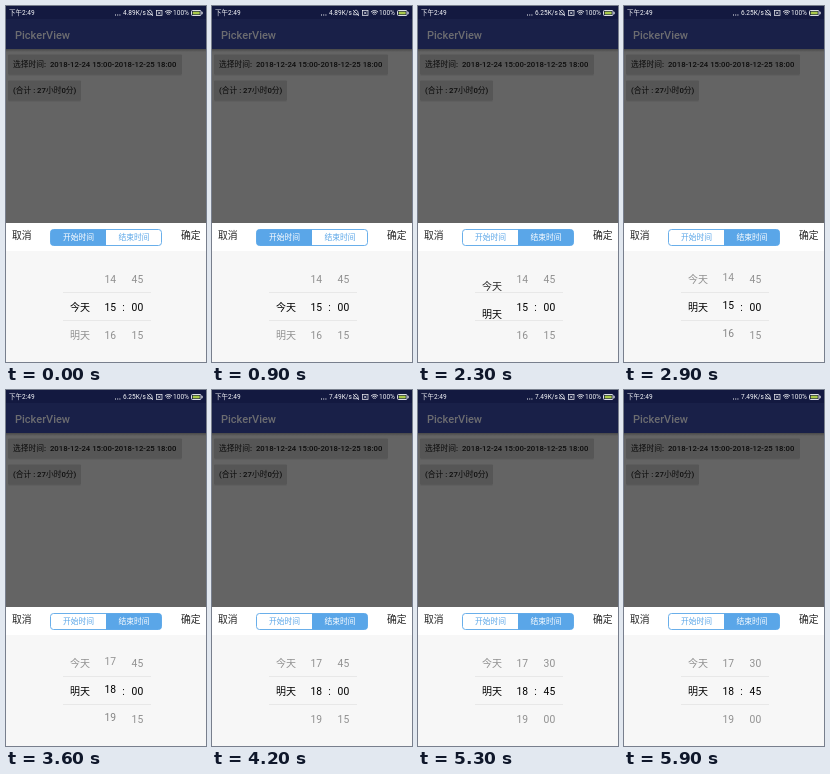
These frames come from a looping animation (200 by 356 pixels, 6000 ms). An HTML page with a canvas:

```html
<!DOCTYPE html>
<html lang="zh">
<head>
<meta charset="utf-8">
<title>PickerView</title>
<style>
html, body { margin: 0; width: 100%; height: 100%; overflow: hidden; background: #646464; }
canvas { display: block; width: 200px; height: 356px; }
</style>
</head>
<body>
<canvas id="stage"></canvas>
<script>
const W = 200, H = 356, LOOP = 6000, STEP = 100;
const ROW = 28, MID = 301.2;
const BLUE = '#5aa6e8';
const FONT = 'Roboto, "Noto Sans CJK SC", "Noto Sans CJK", sans-serif';

const canvas = document.getElementById('stage');
const ctx = canvas.getContext('2d');
const ratio = window.devicePixelRatio || 1;
canvas.width = W * ratio;
canvas.height = H * ratio;
ctx.scale(ratio, ratio);

function rect(x, y, w, h, color) {
  ctx.fillStyle = color;
  ctx.fillRect(x, y, w, h);
}

function roundRect(x, y, w, h, radii) {
  ctx.beginPath();
  ctx.roundRect(x, y, w, h, radii);
}

function text(str, x, y, size, color, align = 'left', weight = 400) {
  ctx.font = `${weight} ${size}px ${FONT}`;
  ctx.fillStyle = color;
  ctx.textAlign = align;
  ctx.textBaseline = 'alphabetic';
  ctx.fillText(str, x, y + size * 0.36);
}

function line(points, color, width = 0.8) {
  ctx.strokeStyle = color;
  ctx.lineWidth = width;
  ctx.beginPath();
  points.forEach(([x, y]) => ctx.lineTo(x, y));
  ctx.stroke();
}

// Interpolates between [time, value] keys with a smooth ease on each span.
function track(t, keys) {
  if (t <= keys[0][0]) return keys[0][1];
  for (let i = 1; i < keys.length; i++) {
    const [t0, v0] = keys[i - 1], [t1, v1] = keys[i];
    if (t < t1) {
      const p = (t - t0) / (t1 - t0);
      return v0 + (v1 - v0) * p * p * (3 - 2 * p);
    }
  }
  return keys[keys.length - 1][1];
}

const pad = n => String(n).padStart(2, '0');
const dayLabel = i => ['今天', '明天'][i] || '';
const hourLabel = i => pad((i + 24) % 24);
const minuteLabel = i => pad(((i % 4 + 4) % 4) * 15);

function drawStatus(t) {
  const ink = '#f4f5f8';
  const speed = t < 1000 ? '4.89' : t < 4000 ? '6.25' : '7.49';
  rect(0, 0, W, 13, '#131940');
  text('下午2:49', 3, 7, 6.5, ink);
  for (let i = 0; i < 3; i++) rect(109 + i * 2.2, 8.5, 1, 1, ink);
  text(speed + 'K/s', 117, 7, 6.5, ink);

  // muted bell
  ctx.strokeStyle = ink;
  ctx.lineWidth = 0.7;
  ctx.beginPath();
  ctx.moveTo(141.5, 8.7);
  ctx.quadraticCurveTo(142, 4, 144, 4);
  ctx.quadraticCurveTo(146, 4, 146.5, 8.7);
  ctx.closePath();
  ctx.stroke();
  line([[141, 4], [147, 10]], ink, 0.7);

  // missing SIM
  ctx.strokeRect(150.5, 4.5, 5.5, 5);
  line([[152, 5.7], [154.5, 8.3]], ink, 0.7);
  line([[154.5, 5.7], [152, 8.3]], ink, 0.7);

  // wifi
  ctx.lineWidth = 0.9;
  for (const r of [1.5, 3.3, 5]) {
    ctx.beginPath();
    ctx.arc(162.5, 9.6, r, -Math.PI * 0.75, -Math.PI * 0.25);
    ctx.stroke();
  }
  text('100%', 167, 7, 6.6, ink);

  // charging battery
  roundRect(185.5, 4.5, 9.5, 5, 1);
  ctx.stroke();
  rect(186.7, 5.6, 7, 2.8, '#a9c94a');
  rect(195.6, 5.8, 1, 2.4, ink);
}

function drawButton(label, y, w) {
  roundRect(2, y, w, 20, 1);
  ctx.fillStyle = '#565656';
  ctx.fill();
  rect(2.5, y + 20, w - 1, 0.8, '#545454');
  text(label, 7, y + 9.5, 7.75, '#0c0c0c', 'left', 500);
}

function drawPage() {
  rect(0, 0, W, H, '#646464');
  rect(0, 13, W, 30, '#192048');
  const shadow = ctx.createLinearGradient(0, 43, 0, 46);
  shadow.addColorStop(0, 'rgba(0,0,0,.28)');
  shadow.addColorStop(1, 'rgba(0,0,0,0)');
  rect(0, 43, W, 3, shadow);
  text('PickerView', 9, 29.3, 11, '#6c6c70', 'left', 500);
  drawButton('选择时间:  2018-12-24 15:00-2018-12-25 18:00', 48.5, 174);
  drawButton('(合计 : 27小时0分)', 74.5, 73);
}

function drawTabs(endActive) {
  const x = 44.5, y = 223.5, w = 111, h = 16, half = w / 2;
  roundRect(x, y, w, h, 3);
  ctx.fillStyle = '#fff';
  ctx.fill();
  roundRect(x + (endActive ? half : 0), y, half, h, endActive ? [0, 3, 3, 0] : [3, 0, 0, 3]);
  ctx.fillStyle = BLUE;
  ctx.fill();
  roundRect(x, y, w, h, 3);
  ctx.strokeStyle = BLUE;
  ctx.lineWidth = 0.9;
  ctx.stroke();
  text('开始时间', 72.5, 231.5, 7.8, endActive ? BLUE : '#fff', 'center');
  text('结束时间', 128, 231.5, 7.8, endActive ? '#fff' : BLUE, 'center');
}

function drawWheel(x, pos, label, size) {
  const base = Math.round(pos);
  for (let i = base - 2; i <= base + 2; i++) {
    const offset = i - pos, d = Math.abs(offset);
    const alpha = track(d, [[0.6, 1], [1, 0.42], [1.4, 0.22], [1.7, 0]]);
    if (alpha <= 0) continue;
    text(label(i), x, MID + offset * ROW, size, `rgba(0,0,0,${alpha})`, 'center');
  }
}

function drawPicker(t) {
  rect(0, 217, W, 28, '#fff');
  rect(0, 245, W, H - 245, '#f7f7f7');
  text('取消', 6, 229.5, 9.8, '#222');
  text('确定', 194.5, 229.5, 9.8, '#222', 'right');
  drawTabs(t >= 1000);

  rect(57, 286, 88, 0.7, '#e2e2e2');
  rect(57, 314, 88, 0.7, '#e2e2e2');

  const day = track(t, [[1900, 0], [2500, 1]]);
  const hour = track(t, [[2800, 15], [2900, 15.07], [3500, 18.07], [3600, 18.07], [3900, 18]]);
  const minute = track(t, [[4200, 0], [4700, 2.4], [5100, 3]]);

  ctx.save();
  ctx.beginPath();
  ctx.rect(0, 260, W, 80);
  ctx.clip();
  drawWheel(74, day, dayLabel, 10);
  drawWheel(104.2, hour, hourLabel, 10.3);
  drawWheel(131.4, minute, minuteLabel, 10.3);
  ctx.restore();
  text(':', 117.5, MID, 10.3, '#000', 'center');
}

function frame(now) {
  const t = Math.floor((now % LOOP) / STEP) * STEP;
  drawPage();
  drawStatus(t);
  drawPicker(t);
  requestAnimationFrame(frame);
}
requestAnimationFrame(frame);
</script>
</body>
</html>
```
